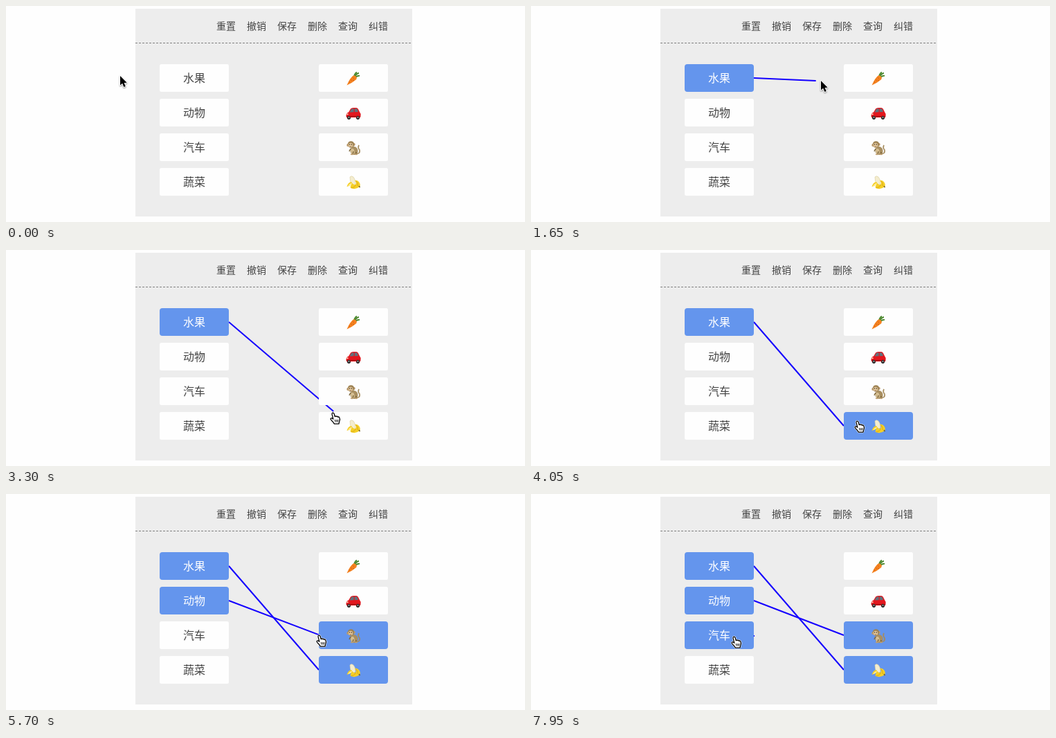
Recreate the animation shown at these times as an HTML page with a canvas. Size 750 by 312 pixels, loop 8 s.

```html
<!DOCTYPE html>
<html lang="zh">
<head>
<meta charset="utf-8">
<title>连线题</title>
<style>
html, body { margin: 0; width: 100%; height: 100%; overflow: hidden; background: #fefefe; }
canvas { display: block; }
</style>
</head>
<body>
<canvas id="stage" width="750" height="312"></canvas>
<script>
const ctx = document.getElementById('stage').getContext('2d');
const LOOP = 8000, STEP = 150, LAG = 18;
const BLUE = '#6495ed', WHITE = '#fefefe', INK = '#444', LINE = '#1400ff';
const FONT = '"Noto Sans CJK SC", "Noto Sans CJK", sans-serif';
const LEFT = 222, RIGHT = 452, BOX_W = 100, BOX_H = 40;
const MENU = ['重置', '撤销', '保存', '删除', '查询', '纠错'];
const LABELS = ['水果', '动物', '汽车', '蔬菜'];
const ICONS = [carrot, car, monkey, banana];

// Each link: rows on both sides, time of press and of release.
const LINKS = [
  { from: 0, to: 3, press: 1200, release: 4050 },
  { from: 1, to: 2, press: 4950, release: 6450 },
  { from: 2, to: 1, press: 7950, release: 9000 }
];

// Pointer hot spot: time, x, y.
const POINTER = [
  [0, 165, 101], [300, 165, 101], [450, 196, 103], [600, 254, 106], [750, 284, 107],
  [1200, 284, 107], [1350, 310, 107], [1500, 358, 108], [1650, 419, 108],
  [1800, 462, 110], [1950, 481, 113], [2100, 484, 117], [2250, 484, 125],
  [2400, 484, 146], [2550, 482, 165], [2700, 479, 178], [3150, 475, 219],
  [3300, 473, 235], [3450, 472.5, 243], [3600, 472, 247], [4050, 472, 247],
  [4200, 462, 242], [4350, 420, 215], [4500, 368, 185], [4650, 327, 166],
  [4800, 310, 158], [4950, 309, 157], [5100, 312, 158], [5250, 340, 166],
  [5400, 395, 184], [5550, 446, 199], [5700, 453, 204], [6000, 457, 207],
  [6750, 457, 207], [6900, 446, 202], [7050, 410, 186], [7200, 366, 175],
  [7350, 325, 173], [7500, 304, 182], [7650, 296, 197], [7800, 294, 206], [8000, 294, 206]
];

const rowTop = row => 84 + row * 50;
const rowMid = row => rowTop(row) + BOX_H / 2;

function pointerAt(t) {
  const i = Math.max(1, POINTER.findIndex(k => k[0] >= t));
  const [t0, x0, y0] = POINTER[i - 1], [t1, x1, y1] = POINTER[i];
  const u = Math.max(0, (t - t0) / (t1 - t0));
  return { x: x0 + (x1 - x0) * u, y: y0 + (y1 - y0) * u };
}

function rowUnder(p, left) {
  if (p.x < left || p.x > left + BOX_W) return -1;
  return LABELS.findIndex((_, row) => p.y >= rowTop(row) && p.y <= rowTop(row) + BOX_H);
}

function shape(d, fill, stroke, width = 1) {
  const path = new Path2D(d);
  if (fill) { ctx.fillStyle = fill; ctx.fill(path); }
  if (stroke) { ctx.strokeStyle = stroke; ctx.lineWidth = width; ctx.stroke(path); }
}

function oval(x, y, rx, ry, fill, turn = 0) {
  ctx.beginPath();
  ctx.ellipse(x, y, rx, ry, turn, 0, Math.PI * 2);
  ctx.fillStyle = fill;
  ctx.fill();
}

function at(x, y, draw) {
  ctx.save();
  ctx.translate(x, y);
  draw();
  ctx.restore();
}

function carrot() {
  shape('M1 -4 Q3 -9 5 -9 M2 -3 Q5 -8 8 -8 M3 -2 Q7 -5 9 -4', null, '#4e8a32', 2);
  shape('M-9.5 9.5 Q-6 1 -1 -4 Q2 -6 4 -3 Q6 0 3 2 Q-3 7 -9.5 9.5Z', '#f58220');
  shape('M-1 -2 L1 0 M-4 1 L-2 3 M1 3 L-1 2 M-5 6 L-6 4', null, '#cf5f12', .8);
}

function car() {
  oval(-6.5, 6, 2.6, 3, '#222');
  oval(6.5, 6, 2.6, 3, '#222');
  shape('M-10.5 3 Q-10 -1 -7 -1.5 L-4 -6.5 Q-3 -8 0 -8 L4 -8 Q6 -8 7 -6 L9 -2 Q11 0 10.5 4 L10 6 L-10 6Z', '#e3171e');
  shape('M-5.5 -1.5 L-3 -6 Q-2 -6.8 0 -6.8 L.6 -6.8 L.6 -1.8Z M1.8 -6.8 L4 -6.8 Q5.5 -6.5 6 -5 L7 -2 L1.8 -1.8Z', '#62717c');
  shape('M-10 4.5 L10 4.5', null, '#9d1014', 1.2);
  oval(-8.5, 1.2, 1.2, 1, '#ffe1c4');
  oval(-6.5, 6, 2, 2.3, '#292929');
  oval(6.5, 6, 2, 2.3, '#292929');
  oval(-6.5, 6, .9, 1, '#b5b5b5');
  oval(6.5, 6, .9, 1, '#b5b5b5');
}

function monkey() {
  shape('M4 8 Q10 9 9 3 Q6 0 8 -4', null, '#a58b5d', 1.7);
  oval(1, 4, 5.5, 6, '#a98f61', -.3);
  oval(-1, 5, 2.6, 4, '#d6bf92', -.2);
  oval(-8, -4, 1.7, 2, '#bd9c70');
  oval(1, -5, 1.7, 2, '#bd9c70');
  oval(-3.5, -5, 4.7, 4.8, '#9d8253');
  oval(-4, -4, 3.3, 3.3, '#e2c69a');
  oval(-5.4, -5, .7, .8, '#30271d');
  oval(-2.6, -5, .7, .8, '#30271d');
  shape('M-5.4 -2 Q-4 -1 -2.6 -2', null, '#7b5635', .8);
  shape('M-4 1 L-6 5 M0 5 L-1 9 M4 6 L4 9', null, '#7f693f', 1.5);
  oval(-2, 9.3, 2.3, 1, '#bf9f70');
  oval(4, 9.3, 2, 1, '#bf9f70');
}

function banana() {
  shape('M-5 -8 Q-3 -10.5 0 -8 Q3 -5 3 2 L-2 4 Q-5 -1 -5 -8Z', '#f4edcf', '#d9cd9e', .6);
  shape('M-3 -1 Q-8 0 -9.5 6 Q-5 5 -3 3 Q-5 6 -4 8 Q3 11 9 6 Q11 3 8 -1 Q5 -4 2 -3 Q5 0 3 3 Q0 4 -3 -1Z', '#f5cf27');
  shape('M-8 5 Q-5 1 -2 1 Q-3 4 -8 5Z', '#fff0a8');
  shape('M3 3 Q3 7 -3 7.5 M4 -2 Q7 1 6 5', null, '#d6a515', .9);
  shape('M8 5 L9.5 7', null, '#73622a', 1.5);
}

function arrow() {
  const d = 'M0 0 L0 13.5 L3.1 10.7 L5.4 16 L7.8 15 L5.6 9.9 L9.7 9.7Z';
  ctx.lineJoin = 'round';
  ctx.shadowColor = 'rgba(0,0,0,.35)';
  ctx.shadowBlur = 2;
  ctx.shadowOffsetY = 1;
  shape(d, WHITE, WHITE, 2);
  ctx.shadowColor = 'transparent';
  shape(d, '#000');
}

function hand() {
  const d = 'M3 2.4 Q3 .6 4.6 .6 Q5.8 .8 6.2 2.2 L7.2 6 Q8 5 9.3 6 Q10.5 5.3 11.4 6.6 Q13.4 6 14 8 Q15 10 13.9 12.5 L13 16.6 L6.4 16.6 Q4.8 13.6 2.2 11.4 Q.4 9.4 1.6 8.5 Q2.8 8 4.8 9.7Z';
  ctx.translate(-5, -.5);
  ctx.lineJoin = 'round';
  shape(d, WHITE, WHITE, 2.4);
  shape(d, WHITE, '#000', 1.3);
  shape('M7.4 10.5 L8 14 M9.6 10.5 L9.8 14 M11.7 10.5 L11.5 14', null, '#000', .9);
}

function line(x1, y1, x2, y2, color, width) {
  ctx.beginPath();
  ctx.moveTo(x1, y1);
  ctx.lineTo(x2, y2);
  ctx.strokeStyle = color;
  ctx.lineWidth = width;
  ctx.stroke();
}

function box(left, row, on) {
  ctx.beginPath();
  ctx.roundRect(left, rowTop(row), BOX_W, BOX_H, on ? 4 : 2.5);
  ctx.fillStyle = on ? BLUE : WHITE;
  ctx.fill();
}

function panel() {
  ctx.fillStyle = WHITE;
  ctx.fillRect(0, 0, 750, 312);
  ctx.fillStyle = '#ededed';
  ctx.fillRect(187, 4, 400, 300);
  ctx.setLineDash([3, 2]);
  line(187, 53.5, 587, 53.5, '#808080', 1);
  ctx.setLineDash([]);
  ctx.font = `14px ${FONT}`;
  ctx.textAlign = 'left';
  ctx.fillStyle = INK;
  MENU.forEach((word, i) => ctx.fillText(word, 304 + i * 44, 34));
}

function render(t) {
  const pointer = pointerAt(t), seen = pointerAt(t - LAG);
  const litLeft = new Set(), litRight = new Set();
  panel();
  for (const { from, to, press, release } of LINKS) {
    if (t < press) continue;
    litLeft.add(from);
    const done = t >= release;
    litRight.add(done ? to : rowUnder(seen, RIGHT));
    const end = done ? { x: RIGHT, y: rowMid(to) } : seen;
    line(LEFT + BOX_W, rowMid(from), Math.max(end.x, LEFT + BOX_W), end.y, LINE, 2);
  }
  ctx.textAlign = 'center';
  LABELS.forEach((label, row) => {
    const on = litLeft.has(row);
    box(LEFT, row, on);
    box(RIGHT, row, litRight.has(row));
    ctx.font = `${on ? 500 : 400} 16px ${FONT}`;
    ctx.fillStyle = on ? '#fff' : INK;
    ctx.fillText(label, LEFT + BOX_W / 2, rowMid(row) + 6);
    at(RIGHT + BOX_W / 2, rowMid(row) + 1, ICONS[row]);
  });
  // A free end stays visible in the gap and just over the edge of a box not yet lit.
  const overBox = rowUnder(pointer, LEFT) >= 0 || rowUnder(pointer, RIGHT) >= 0;
  at(pointer.x, pointer.y, overBox ? hand : arrow);
}

function tick(now) {
  render(Math.floor((now % LOOP) / STEP) * STEP);
  requestAnimationFrame(tick);
}
tick(performance.now());
</script>
</body>
</html>
```
